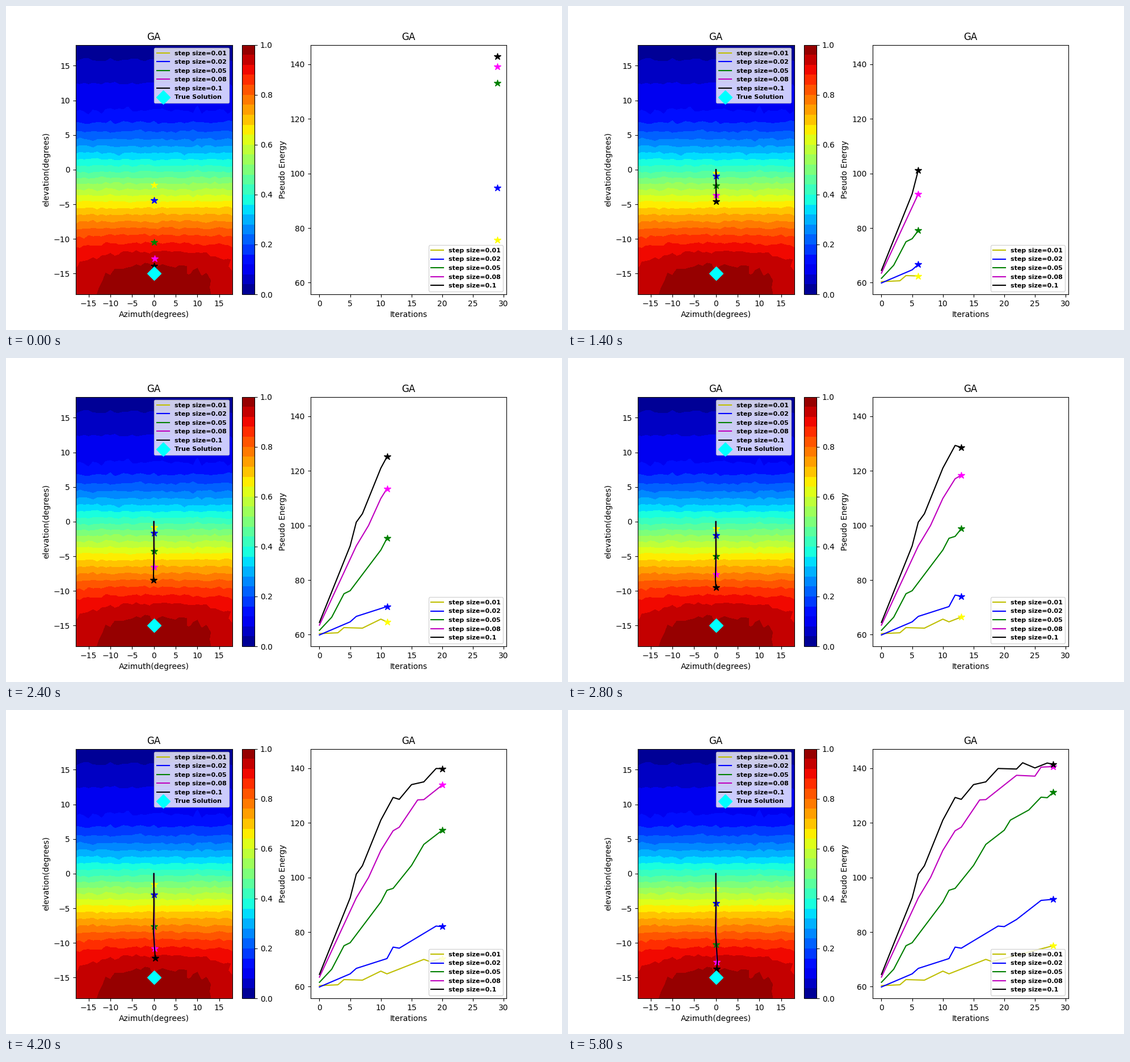
A matplotlib script that plays this animation: 980x572 px, repeating every 6 s.

```python
import numpy as np
import matplotlib.pyplot as plt
from matplotlib.animation import FuncAnimation

STEPS = 30
n = np.arange(STEPS)


def through(points):
    """Values at every iteration, straight between the given turning points."""
    return np.interp(n, list(points), list(points.values()))


def energy_map():
    """Normalised energy over azimuth and elevation, with slight noise."""
    rng = np.random.default_rng(4)
    axis = np.linspace(-18, 18, 37)
    az, el = np.meshgrid(axis, axis)
    sag = 8 * (np.clip(-5 - el, 0, None) / 13) ** 3.3
    eff = el + sag * (az / 18) ** 2
    eff = np.where(el < -14.3, np.minimum(eff, -12.5), eff)
    profile = {-18: 0.985, -16: 0.995, -13.8: 0.96, -11.8: 0.92, -9.4: 0.84,
               -6.5: 0.72, -4.6: 0.64, -1.2: 0.48, 1.4: 0.36, 4.3: 0.24,
               6.7: 0.16, 8.33: 0.12, 12.45: 0.08, 15.75: 0.04, 18: 0.012}
    z = np.interp(eff, list(profile), list(profile.values()))
    noise = rng.normal(0, 1, z.shape) * np.interp(el, [5, 12], [0.0055, 0.002])
    return axis, np.clip(z + noise, 0.001, 0.999)


fig = plt.figure(figsize=(9.8, 5.72), dpi=100)
ax_map = fig.add_subplot(1, 2, 1)
ax_energy = fig.add_subplot(1, 2, 2)

grid, z = energy_map()
bands = ax_map.contourf(grid, grid, z, levels=np.linspace(0, 1, 26),
                        cmap="jet", vmin=0, vmax=1)
fig.colorbar(bands, ax=ax_map, ticks=np.linspace(0, 1, 6), format="%.1f")

ax_map.set(title="GA", xlabel="Azimuth(degrees)", ylabel="elevation(degrees)",
           xlim=(-18, 18), ylim=(-18, 18),
           xticks=range(-15, 16, 5), yticks=range(-15, 16, 5))
ax_energy.set(title="GA", xlabel="Iterations", ylabel="Pseudo Energy",
              xlim=(-1.45, 30.45), ylim=(55.73, 147.08),
              xticks=range(0, 31, 5), yticks=range(60, 141, 20))

tracks = []


def add_track(ax, x, y, color, star_color, label):
    line, = ax.plot([], [], color=color, label=label)
    star, = ax.plot([], [], "*", color=star_color, markersize=9)
    tracks.append((line, star, x, y))


def add_run(size, color, star_color, az, el, energy):
    label = f"step size={size}"
    add_track(ax_map, az, el, color, star_color, label)
    add_track(ax_energy, n, through(energy), color, star_color, label)


add_run(0.01, "y", "yellow", 0 * n, -0.0776 * n,
        {0: 60.4, 3: 60.7, 4: 62.6, 7: 62.4, 10: 65.7, 11: 64.7, 17: 70,
         18: 69.2, 29: 75.6})
add_run(0.02, "b", "blue", 0 * n, -0.153 * n,
        {0: 59.9, 5: 64.7, 6: 66.7, 11: 70.3, 12: 74.5, 13: 74.1, 19: 82.2,
         20: 82, 22: 84.6, 26: 91.6, 28: 92, 29: 94.8})
add_run(0.05, "g", "green", 0.1 * np.sin(np.pi * n / 29),
        -0.388 * n + 1.1e-6 * n ** 4,
        {0: 61.6, 2: 66.4, 4: 75, 5: 76.1, 10: 91, 11: 95.3, 12: 96,
         15: 104.4, 17: 112.1, 20: 117.3, 21: 121, 24: 124.7, 26: 129.4,
         27: 129.2, 29: 133.2})
add_run(0.08, "m", "magenta", 0.2 * n / 29, -0.625 * n + 2.15e-4 * n ** 3,
        {0: 63.5, 6: 92.5, 8: 100, 10: 109.9, 12: 117.1, 13: 118.4,
         16: 128.4, 17: 128.5, 22: 137.4, 25: 137.1, 26: 140.4, 28: 140.6,
         29: 139.2})
add_run(0.1, "k", "black",
        through({0: 0, 6: 0, 11: -0.1, 16: 0.2, 22: 0.35, 29: 0.1}),
        through({0: 0, 11: -8.4, 16: -11.05, 24: -13.3, 29: -13.9}),
        {0: 64.5, 5: 92.5, 6: 101.2, 7: 104.3, 10: 121, 12: 129.3, 13: 128.6,
         15: 134, 17: 135, 19: 139.9, 22: 139.7, 23: 142, 25: 140.1,
         27: 141.9, 28: 141.4, 29: 142.9})

ax_map.plot([0], [-15], "D", color="cyan", markersize=12, label="True Solution")

font = {"weight": "bold", "size": 8}
ax_map.legend(loc="upper right", prop=font)
ax_energy.legend(loc="lower right", prop=font)


def update(k):
    # At k = 0 the lines are empty and the stars sit on the last point.
    for line, star, x, y in tracks:
        line.set_data(x[:k], y[:k])
        star.set_data([x[k - 1]], [y[k - 1]])
    return [artist for track in tracks for artist in track[:2]]


ani = FuncAnimation(fig, update, frames=STEPS, interval=200, repeat=True,
                    repeat_delay=0, blit=False)
plt.show()
```
